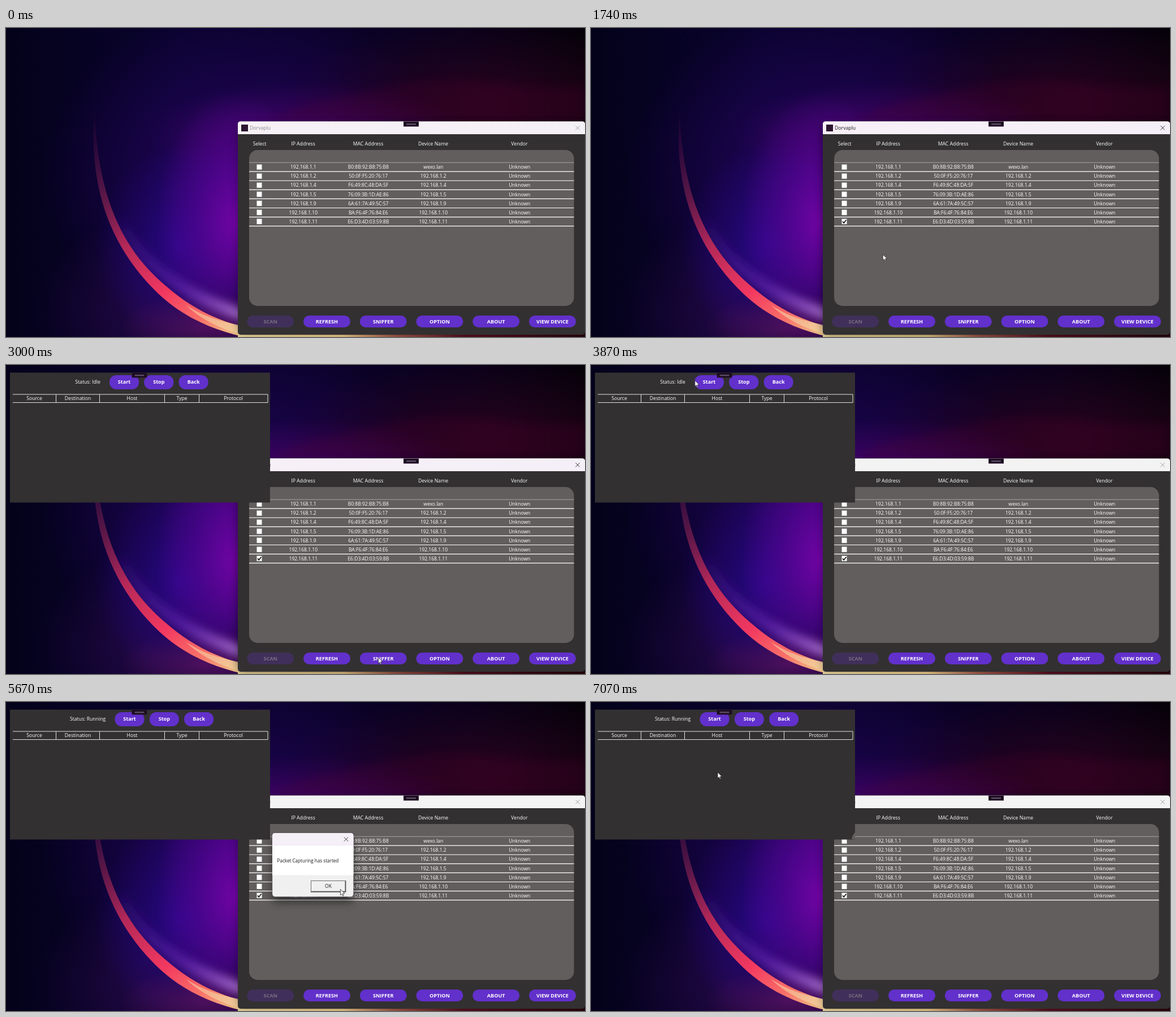
These frames come from a looping animation (1024x547 px, 8000 ms). An HTML page:

```html
<!DOCTYPE html>
<html lang="en">
<head>
<meta charset="utf-8">
<title>Network list</title>
<style>
html, body { margin: 0; width: 100%; height: 100%; overflow: hidden; background: #05021c; }
#stage {
  position: relative; width: 1024px; height: 547px; overflow: hidden;
  background:
    radial-gradient(ellipse 150px 60px at 350px 530px, #70186890, #70186800),
    radial-gradient(ellipse 140px 230px at 405px 345px, #7004a4, #6404a080 50%, #5404a000),
    radial-gradient(ellipse 150px 180px at 310px 385px, #2c0898c0, #28088870 50%, #28088800),
    radial-gradient(ellipse 280px 90px at 530px 185px, #56046ca0, #56046c00),
    radial-gradient(ellipse 360px 150px at 850px 135px, #340420c0, #2e042070 50%, #2c042000),
    radial-gradient(ellipse 370px 300px at 430px 260px, #3a0480d0, #28046870 50%, #1c045000),
    radial-gradient(ellipse 200px 160px at 250px 500px, #300a54a0, #300a5400),
    linear-gradient(90deg, #04021a, #0a032e 30%, #0b022a 55%, #08011a 80%, #050108);
}
svg { position: absolute; left: 0; top: 0; display: block; }
text { font-family: "Open Sans", "Noto Sans", sans-serif; font-size: 8.5px; fill: #fff; }
.mid { text-anchor: middle; }
.head { font-size: 8.7px; }
.btn { font-size: 9.1px; font-weight: 700; }
.dark { fill: #1a1a1a; }
</style>
</head>
<body>
<div id="stage">
<svg width="1024" height="547" viewBox="0 0 1024 547">
  <defs>
    <linearGradient id="rim" gradientUnits="userSpaceOnUse" x1="158" y1="140" x2="430" y2="545">
      <stop offset="0" stop-color="#5a1046" stop-opacity="0"/>
      <stop offset=".25" stop-color="#6a1c4c" stop-opacity=".7"/>
      <stop offset=".48" stop-color="#b42858"/>
      <stop offset=".7" stop-color="#f23860"/>
      <stop offset=".85" stop-color="#f97068"/>
      <stop offset="1" stop-color="#ecd690"/>
    </linearGradient>
    <linearGradient id="halo" gradientUnits="userSpaceOnUse" x1="190" y1="300" x2="420" y2="530">
      <stop offset="0" stop-color="#5a18b0" stop-opacity="0"/>
      <stop offset=".6" stop-color="#6a28b8" stop-opacity=".6"/>
      <stop offset="1" stop-color="#b880d8"/>
    </linearGradient>
    <linearGradient id="floor">
      <stop offset="0" stop-color="#e8d498"/>
      <stop offset=".3" stop-color="#e8c888"/>
      <stop offset=".45" stop-color="#a05848"/>
      <stop offset=".65" stop-color="#581020"/>
      <stop offset="1" stop-color="#28040c"/>
    </linearGradient>
    <linearGradient id="mica">
      <stop offset="0" stop-color="#f8f0f7"/>
      <stop offset="1" stop-color="#f4eff8"/>
    </linearGradient>
    <filter id="soft"><feGaussianBlur stdDeviation=".7"/></filter>
    <filter id="wide" x="-30%" y="-30%" width="160%" height="160%"><feGaussianBlur stdDeviation="8"/></filter>
  </defs>
  <path d="M470 165C520 130 590 128 640 112S760 90 820 92S960 112 1024 100V165Z" fill="#4c042c" opacity=".25" filter="url(#wide)"/>
  <path d="M200 340C235 410 300 468 430 512" fill="none" stroke="url(#halo)" stroke-width="20" filter="url(#wide)"/>
  <path d="M157 140C146 260 172 372 262 463C318 520 385 541 450 553V536C385 524 332 500 282 456C208 394 160 300 157 140Z" fill="url(#rim)" filter="url(#soft)"/>
  <path d="M318 490C350 512 385 521 420 527V544C380 532 345 517 318 490Z" fill="#f4dca8" opacity=".55" filter="url(#soft)"/>
  <rect x="410" y="542" width="614" height="5" fill="url(#floor)"/>
  <g id="main"></g>
  <g id="sniffer"></g>
  <path id="chip" d="M467 231Q462 235 461 243H467Z" fill="#625e5e"/>
  <g id="dialog"></g>
  <path id="cursor" d="M0 0V16.5L3.8 13L6.5 19L9 18L6.4 12H12Z" fill="#fff" stroke="#111" stroke-width="1.1"/>
</svg>
</div>
<script>
const $ = id => document.getElementById(id);
const LOOP = 8000, FRAME = 1000 / 15;
const BODY = '#323031', VIOLET = '#6230cb';

const rect = (x, y, w, h, fill, r = 0, extra = '') =>
  `<rect x="${x}" y="${y}" width="${w}" height="${h}" rx="${r}" fill="${fill}" ${extra}/>`;
const label = (x, y, str, cls = 'mid', extra = '') =>
  `<text x="${x}" y="${y}" class="${cls}" ${extra}>${str}</text>`;
const line = (d, color = '#fff', w = 1, extra = '') =>
  `<path d="${d}" fill="none" stroke="${color}" stroke-width="${w}" ${extra}/>`;
const cross = (x, y, r, id, color) =>
  line(`M${x - r} ${y - r}l${2 * r} ${2 * r}m0 ${-2 * r}l${-2 * r} ${2 * r}`, color, 0.9, `id="${id}"`);
const topBar = (x, y, w, h) =>
  `M${x} ${y + h}v${5 - h}q0 -5 5 -5h${w - 10}q5 0 5 5v${h - 5}Z`;
const grip = (x, y) =>
  rect(x + 0.5, y + 0.5, 26, 8, '#180c1c', 0, 'stroke="#2e1634"') +
  rect(x + 5, y + 3.5, 17, 2.5, '#5c4a64');

function buildMain() {
  const cols = [525.5, 640.5, 755.5, 908];
  const rows = [
    '1 B0:8B:92:B8:75:B8 wexo.lan', '2 50:0F:F5:20:76:17', '4 F6:49:8C:48:DA:5F',
    '5 76:09:3B:1D:AE:86', '9 6A:61:7A:49:5C:57', '10 BA:F6:4F:76:84:E6', '11 E6:D3:4D:03:59:8B'
  ];
  let s = rect(410, 172, 614, 371, '#000', 6, 'id="shade" filter="url(#wide)"');
  s += rect(410, 165.5, 614, 377.5, BODY, 5);
  const bar = topBar(410, 165.5, 614, 22.5);
  s += `<path d="${bar}" fill="#f3f3f3"/><path id="tint" d="${bar}" fill="url(#mica)"/>`;
  s += rect(416, 171, 12, 12, '#2c1630');
  s += label(431, 180.3, 'Dorvaplu', 'head', 'id="title"');
  s += cross(1011, 176.8, 3.7, 'close', '#888') + grip(703, 165.5);
  ['Select', 'IP Address', 'MAC Address', 'Device Name', 'Vendor'].forEach((h, i) =>
    s += label([448.7, ...cols][i], 207.7, h, 'mid head'));
  s += rect(430, 216, 574.5, 276, '#625e5e', 15);
  s += line('M430 238.2H1004.5', '#a9a6a6');
  rows.forEach((row, i) => {
    const [n, mac, name] = row.split(' ');
    const y = 246 + i * 16.07, ip = '192.168.1.' + n;
    s += rect(443.2, y - 4.7, 9.6, 9.6, '#fff', 0, `stroke="#777" stroke-width=".6" id="box${i}"`);
    [ip, mac, name || ip, 'Unknown'].forEach((c, k) => s += label(cols[k] + 0.3, y + 3.3, c));
    s += line(`M430 ${y + 8.2}H1004.5`, '#fff', 1.2);
  });
  s += line('M445 342.4l2.2 2.7l4.2 -5.4', '#111', 1.6, 'id="tick"');
  ['SCAN', 'REFRESH', 'SNIFFER', 'OPTION', 'ABOUT', 'VIEW DEVICE'].forEach((b, i) => {
    const x = 467.7 + i * 99.75;
    s += rect(x - 41.5, 509, 83, 21, i ? VIOLET : '#402f5a', 10.5);
    s += label(x, 522.6, b, 'mid btn', i ? '' : 'style="fill:#776f80"');
  });
  $('main').innerHTML = s;
}

function buildSniffer() {
  let s = rect(7, 13.5, 460, 230, BODY);
  s += label(144.6, 33.2, '', 'mid head', 'id="status"');
  s += '<g id="controls">';
  ['Start', 'Stop', 'Back'].forEach((b, i) => {
    const x = 209 + i * 61.3;
    s += rect(x - 26, 18, 52, 25, VIOLET, 12) + label(x, 33.2, b, 'mid btn');
  });
  s += '</g>' + grip(222.5, 13.5);
  s += line('M12 52H463V66.5H12M88.5 52V66.5M165.5 52V66.5M280.5 52V66.5M341.5 52V66.5', '#e4e4e4');
  ['Source', 'Destination', 'Host', 'Type', 'Protocol'].forEach((h, i) =>
    s += label([50, 127, 223, 311, 402][i], 62.3, h, 'mid head'));
  $('sniffer').innerHTML = s;
}

function buildDialog() {
  let s = rect(471, 242, 143.5, 112, '#000', 6, 'opacity=".5" filter="url(#wide)"');
  s += rect(471, 232, 143.5, 112.7, '#f0f0f0', 5, 'stroke="#77707a" stroke-width=".5"');
  s += `<path d="${topBar(471, 232, 143.5, 22.5)}" fill="#f5eff7"/>`;
  s += rect(471, 254.5, 143.5, 52, '#fff');
  s += cross(601.5, 243, 3.7, 'x', '#222');
  s += label(479.5, 284, 'Packet Capturing has started', 'dark', 'style="font-size:8.13px"');
  s += rect(539.5, 316.5, 61, 19.5, '#f0f0f0', 0, 'stroke="#6c6c6c"');
  s += line('M541 335H599.5V317.5', '#a0a0a0') + line('M539 336H600.7V316', '#505050', 1.3);
  s += label(570, 329, 'OK', 'mid dark');
  $('dialog').innerHTML = s;
}

const ramp = (t, from, to) => Math.min(1, Math.max(0, (t - from) / (to - from)));
const ease = f => 1 - (1 - f) ** 3;

// each move: begin, end, x, y
const moves = [
  [67, 733, 448.5, 346.5],    // to the check box
  [867, 933, 451.5, 346.5],
  [1067, 1333, 446.5, 343.5],
  [1667, 2200, 658.5, 518],   // to SNIFFER
  [3200, 3733, 89, 45],       // past Start and back
  [3733, 4000, 197.3, 25],
  [4867, 5400, 703, 330],     // past OK and back
  [5400, 5667, 591.5, 331.5],
  [5733, 5933, 584.5, 328.5],
  [6133, 6733, 224, 124.5]    // to rest
];
const pointer = t => moves.reduce(([x, y], [from, to, nx, ny]) => {
  const f = ease(ramp(t, from, to));
  return [x + (nx - x) * f, y + (ny - y) * f];
}, [600, 470]);

const set = (id, name, value) => $(id).setAttribute(name, value);
const show = (id, on) => set(id, 'visibility', on ? 'visible' : 'hidden');

function draw(ms) {
  const t = Math.floor(((ms % LOOP) + 4) / FRAME) * FRAME;
  const active = t >= 1460 && t < 3050;
  const hover = t >= 720 && t < 1720;
  const running = t >= 4130;

  $('title').style.fill = active ? '#1a1a1a' : '#8a8a8a';
  set('close', 'stroke', active ? '#222' : '#999');
  set('tint', 'opacity', 0.7 * (1 - ramp(t, 0, 200)) + ramp(t, 1480, 1667) - ramp(t, 3000, 3133));
  set('shade', 'opacity', active ? 0.5 : 0.3);
  set('box6', 'stroke', hover ? '#3c86e8' : '#777');
  set('box6', 'fill', hover ? '#f1f7ff' : '#fff');
  show('tick', t >= 1530);

  show('sniffer', t >= 2990);
  $('status').textContent = 'Status: ' + (running ? 'Running' : 'Idle');
  set('controls', 'transform', `translate(${running ? 9.5 : 0} 0)`);
  show('chip', t >= 6330);

  const closing = ramp(t, 6200, 6333);
  const alpha = ramp(t, 4433, 4533) - closing;
  const scale = 0.9 + 0.1 * ease(ramp(t, 4433, 4767)) - 0.06 * closing;
  show('dialog', alpha > 0);
  set('dialog', 'opacity', alpha);
  set('dialog', 'transform', `translate(505 266) scale(${scale}) translate(-505 -266)`);

  const [x, y] = pointer(t);
  show('cursor', t > 60);
  set('cursor', 'transform', `translate(${x} ${y}) scale(.63)`);
}

buildMain();
buildSniffer();
buildDialog();
const start = performance.now();
(function tick(now) {
  draw(Math.max(0, now - start));
  requestAnimationFrame(tick);
})(start);
</script>
</body>
</html>
```
